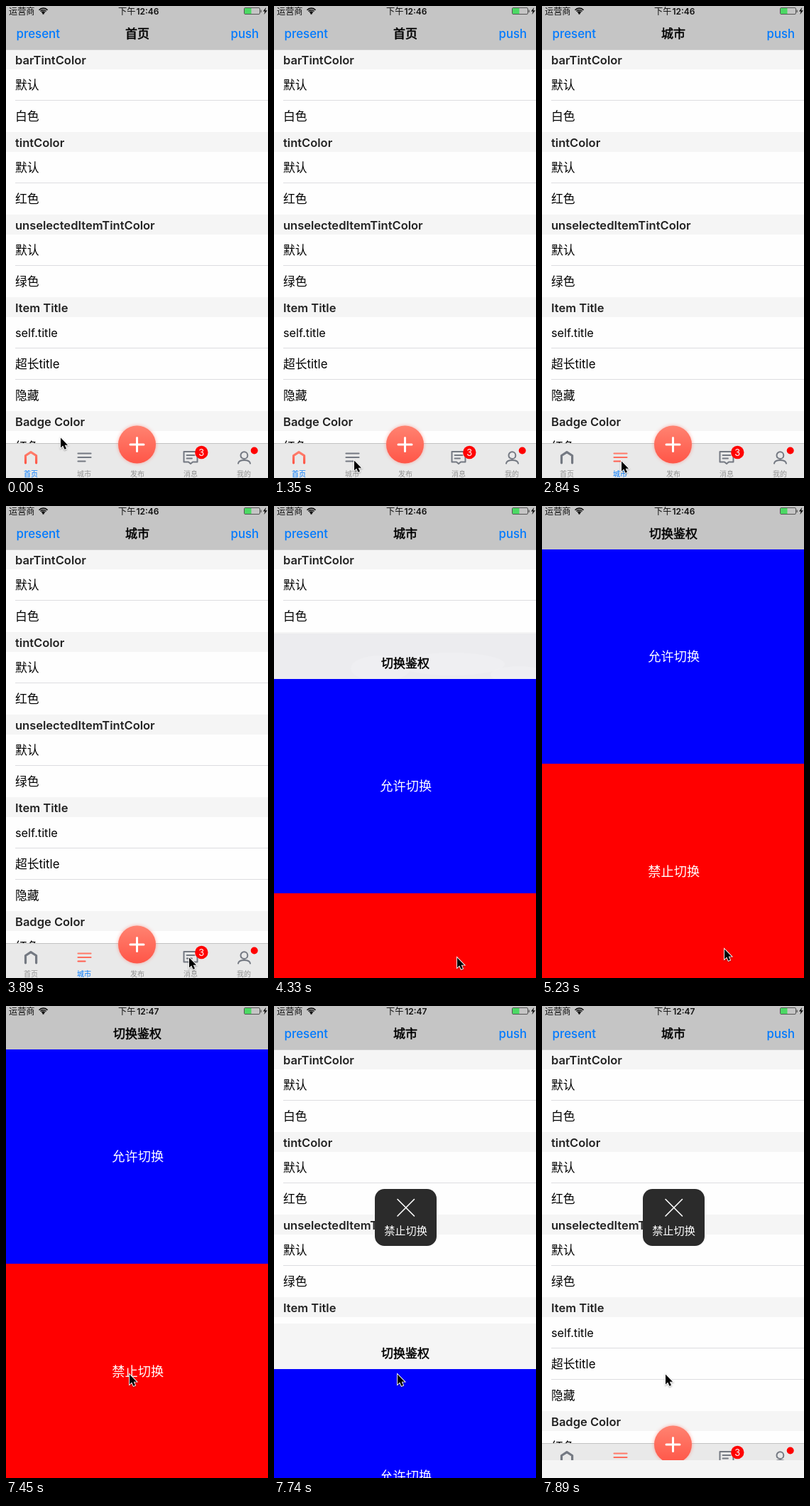
Recreate the animation shown at these times as an HTML page with a canvas. Size 369x663 px, loop 8000 ms.

```html
<!DOCTYPE html>
<html lang="zh-CN">
<head>
<meta charset="utf-8">
<title>Tab bar demo</title>
<style>
html, body { margin: 0; width: 369px; height: 663px; overflow: hidden; background: #fff; }
canvas { display: block; width: 369px; height: 663px; }
</style>
</head>
<body>
<canvas id="stage"></canvas>
<script>
const W = 369, H = 663, LOOP = 8000, STEP = 149;
const SCREEN = 667, TOP = -3, NAV = 61, MID = 185;
const FONT = '"Inter", "Noto Sans CJK SC", "Noto Sans CJK", sans-serif';
const BAR = '#c5c5c5', TINT = '#007aff', GREY = '#747982';

const canvas = document.getElementById('stage');
const dpr = window.devicePixelRatio || 1;
canvas.width = Math.round(W * dpr);
canvas.height = Math.round(H * dpr);
const ctx = canvas.getContext('2d');

const SECTIONS = [
  ['barTintColor', '默认', '白色'],
  ['tintColor', '默认', '红色'],
  ['unselectedItemTintColor', '默认', '绿色'],
  ['Item Title', 'self.title', '超长title', '隐藏'],
  ['Badge Color', '红色']
];
const TABS = ['首页', '城市', '发布', '消息', '我的'];

// Pointer path: step, x, y
const PATH = [
  [0, 77, 606], [1, 76, 606], [2, 76, 606], [9, 113, 638], [10, 111, 639],
  [18, 111, 639], [19, 112, 639], [20, 148, 634], [21, 212, 628], [22, 275, 627],
  [23, 293, 633], [24, 257, 632], [25, 257, 632], [26, 258, 634], [34, 258, 634],
  [35, 257, 622], [36, 248, 545], [37, 228, 420], [38, 207, 312], [39, 195, 270],
  [41, 195, 270], [42, 222, 390], [43, 192, 510], [44, 176, 544], [47, 176, 544],
  [48, 175, 534], [49, 174, 522], [50, 174, 517], [54, 174, 517]
];

function rect(x, y, w, h, fill) {
  ctx.fillStyle = fill;
  ctx.fillRect(x, y, w, h);
}

function text(str, x, y, size, fill, weight = 400, align = 'left') {
  ctx.font = `${weight} ${size}px ${FONT}`;
  ctx.textAlign = align;
  ctx.fillStyle = fill;
  ctx.fillText(str, x, y);
}

// Semibold look between the regular and bold CJK weights
function title(str) {
  text(str, MID, 45, 17, '#000', 400, 'center');
  ctx.strokeStyle = '#000';
  ctx.lineWidth = 0.55;
  ctx.lineJoin = 'round';
  ctx.strokeText(str, MID, 45);
}

function disc(x, y, r, fill) {
  ctx.beginPath();
  ctx.arc(x, y, r, 0, Math.PI * 2);
  ctx.fillStyle = fill;
  ctx.fill();
}

function line(d, stroke, width, cap = 'round') {
  ctx.strokeStyle = stroke;
  ctx.lineWidth = width;
  ctx.lineCap = cap;
  ctx.lineJoin = 'round';
  ctx.stroke(new Path2D(d));
}

function coral(y0, y1) {
  const g = ctx.createLinearGradient(0, y0, 0, y1);
  g.addColorStop(0, '#ff8371');
  g.addColorStop(1, '#ff5648');
  return g;
}

// Critically damped spring: share of the distance still to travel
function rest(ms) {
  const u = Math.max(0, ms) * Math.sqrt(1000 / 3) / 1000;
  return (1 + u) * Math.exp(-u);
}

function pointerAt(n) {
  let i = 0;
  while (i < PATH.length - 2 && PATH[i + 1][0] <= n) i++;
  const [n0, x0, y0] = PATH[i], [n1, x1, y1] = PATH[i + 1];
  const k = Math.min(1, (n - n0) / (n1 - n0));
  return [Math.round(x0 + (x1 - x0) * k), Math.round(y0 + (y1 - y0) * k)];
}

function drawStatus(time) {
  text('运营商', 4, 11.5, 12.2, '#111');
  for (const r of [3, 5.6, 8.2]) {
    ctx.beginPath();
    ctx.arc(52.5, 11.3, r, -Math.PI * 0.76, -Math.PI * 0.24);
    ctx.strokeStyle = '#111';
    ctx.lineWidth = r === 3 ? 2.2 : 1.6;
    ctx.lineCap = 'butt';
    ctx.stroke();
  }
  disc(52.5, 10.4, 1.3, '#111');
  text('下午', 158, 11.5, 12.2, '#111', 500);
  text(time, 215.5, 11.5, 12, '#111', 600, 'right');
  ctx.beginPath();
  ctx.roundRect(335.5, 2.5, 22, 9, 1.5);
  ctx.strokeStyle = '#555';
  ctx.lineWidth = 1;
  ctx.stroke();
  rect(336, 3, 9.5, 8, '#4cd964');
  rect(358.5, 5.5, 1.3, 3.5, '#555');
  ctx.fillStyle = '#111';
  ctx.fill(new Path2D('M366.2 2 L362 7.6 H364.6 L363.4 12 L368 6.2 H365.2 Z'));
}

function drawList() {
  let y = NAV;
  for (const [head, ...rows] of SECTIONS) {
    rect(0, y, W, 28, '#f5f5f5');
    text(head, 13, y + 21, 16.5, '#222', 600);
    y += 28;
    rows.forEach((row, i) => {
      const latin = /^[a-z.]+$/.test(row);
      text(row, 13, y + 28, latin ? 16.3 : 16.8, '#000');
      if (i < rows.length - 1) rect(13, y + 43, W - 13, 1, '#dddde0');
      y += 44;
    });
  }
}

function drawTabs(active) {
  rect(0, 614, W, 49, '#e9e9e9');
  rect(0, 614, W, 1, '#c2c2c2');
  const hue = coral(625, 643);
  const paint = i => i === active ? hue : GREY;

  line('M27.5 641.8 V631.5 L35 626.6 L42.6 631.5 V641.8', paint(0), 3.2);
  line('M101.5 628.5 H119.5 M101.5 634 H119.5 M101.5 639.5 H111.5', paint(1), 2.2);
  line('M250.5 626 H269.5 V640.5 H263 L260 643 L257 640.5 H250.5 Z', GREY, 2);
  line('M254.5 631 H265.5 M254.5 635.5 H262', GREY, 1.8);
  line('M340.3 631.2 A4.9 4.9 0 1 1 330.5 631.2 A4.9 4.9 0 1 1 340.3 631.2', GREY, 2);
  line('M327 642.6 C328 636.5 343 636.5 344 642.6', GREY, 2);

  ctx.save();
  ctx.shadowColor = 'rgba(255,90,75,.5)';
  ctx.shadowBlur = 5 * dpr;
  disc(184.5, 616, 26.5, coral(589, 642));
  ctx.restore();
  line('M175 616 H194 M184.5 606.5 V625.5', '#fff', 3);

  disc(275.3, 627, 9.2, '#f00');
  text('3', 275.3, 631.6, 12.8, '#fff', 400, 'center');
  disc(349.7, 624.5, 5, '#f00');

  TABS.forEach((name, i) =>
    text(name, 35 + 75 * i, 660.5, 10, i === active ? TINT : '#929292', 400, 'center'));
}

function drawHome(active) {
  rect(0, 0, W, H, '#fefefe');
  drawList();
  rect(0, 0, W, NAV, BAR);
  rect(0, NAV, W, 0.5, '#aaa');
  text('present', 14.5, 45, 16.9, TINT, 500);
  title(TABS[active]);
  text('push', 356, 45, 16.7, TINT, 500, 'right');
  drawTabs(active);
}

function drawSheet(offset, moving, tone) {
  ctx.save();
  ctx.translate(0, Math.round(offset));
  rect(0, TOP, W, NAV - TOP, moving ? tone : BAR);
  if (moving && offset < 200) {
    ctx.save();
    ctx.beginPath();
    ctx.rect(0, TOP, W, NAV - TOP);
    ctx.clip();
    ctx.fillStyle = 'rgba(255,255,255,.15)';
    for (const [x, y, rx, ry] of [[150, 46, 42, 18], [250, 40, 75, 16], [345, 55, 40, 12]]) {
      ctx.beginPath();
      ctx.ellipse(x, y, rx, ry, 0, 0, Math.PI * 2);
      ctx.fill();
    }
    ctx.restore();
  }
  title('切换鉴权');
  rect(0, NAV, W, 301, '#00f');
  rect(0, NAV + 301, W, 305, '#f00');
  text('允许切换', 185.7, 218, 18.2, '#fff', 400, 'center');
  text('禁止切换', 185.7, 520, 18.2, '#fff', 400, 'center');
  ctx.restore();
}

function drawToast() {
  ctx.beginPath();
  ctx.roundRect(142, 257, 87, 80, 13.5);
  ctx.fillStyle = '#2b2b2b';
  ctx.fill();
  line('M174 271.5 L197.5 295 M197.5 271.5 L174 295', '#fff', 1.6);
  text('禁止切换', 185.5, 321, 15.2, '#fff', 400, 'center');
}

function drawPointer(x, y) {
  ctx.save();
  ctx.translate(x, y + 0.5);
  const arrow = new Path2D('M0 0 V14 L3.2 11 L5.5 16.3 L8 15.2 L5.7 10.2 H10 Z');
  ctx.shadowColor = 'rgba(0,0,0,.35)';
  ctx.shadowBlur = 2 * dpr;
  ctx.shadowOffsetY = dpr;
  ctx.strokeStyle = '#fff';
  ctx.lineWidth = 1.8;
  ctx.lineJoin = 'miter';
  ctx.stroke(arrow);
  ctx.shadowColor = 'transparent';
  ctx.fillStyle = '#000';
  ctx.fill(arrow);
  ctx.restore();
}

function draw(ms) {
  const n = Math.floor((ms + 8) / STEP), t = n * STEP;
  const closing = n >= 52;
  ctx.setTransform(dpr, 0, 0, dpr, 0, 0);
  ctx.textBaseline = 'alphabetic';
  drawHome(n < 13 ? 0 : 1);
  if (closing) drawSheet(SCREEN * (1 - rest(t - 7621)), true, '#f5f5f5');
  else if (n >= 32) drawSheet(0, false);
  else if (n >= 29) drawSheet(SCREEN * rest(t - 4180), true, '#ececef');
  if (n >= 29 && n < 32) rect(0, 0, W, 18, BAR);
  if (closing) drawToast();
  drawStatus(n < 43 ? '12:46' : '12:47');
  drawPointer(...pointerAt(n));
}

function tick(now) {
  draw(now % LOOP);
  requestAnimationFrame(tick);
}
draw(0);
requestAnimationFrame(tick);
</script>
</body>
</html>
```
